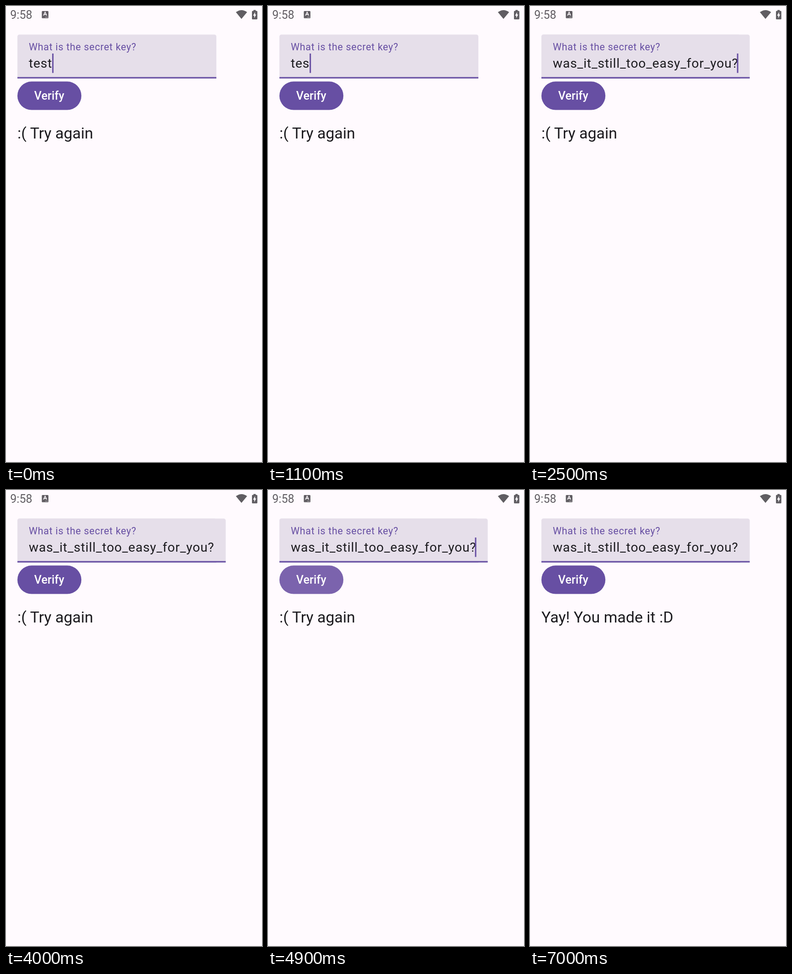
An HTML page for the animation above (7.4 s loop, 561 by 998 pixels).

```html
<!DOCTYPE html>
<html lang="en">
<head>
<meta charset="utf-8">
<title>Secret key form</title>
<style>
  html, body { margin: 0; width: 100%; height: 100%; overflow: hidden; background: #fffafe; }
  svg { display: block; width: 561px; height: 998px; }
  text { font-family: Roboto, sans-serif; fill: #1c1b1f; white-space: pre; }
  .status { fill: #605d62; }
  .clock { font-size: 25px; fill: #605d62; }
  .label { font-size: 21.5px; letter-spacing: .72px; fill: #674fa3; }
  .input { font-size: 28.2px; letter-spacing: .87px; }
  .button { font-size: 25.1px; font-weight: 500; letter-spacing: .1px; fill: #fff; text-anchor: middle; }
  .result { font-size: 34px; }

  .anim { animation: 7.4s step-end infinite; }
  #first { animation-name: first; }
  #second { animation-name: second; }
  #answer, #wide { animation-name: answer; }
  #cursor { animation-name: cursor; }
  #pill { animation-name: press; }
  #fail { animation-name: fail; }
  #win { animation-name: win; }

  @keyframes first { 0% { opacity: 1 } 12.16%, 100% { opacity: 0 } }
  @keyframes second { 0% { opacity: 0 } 12.16% { opacity: 1 } 21.62%, 100% { opacity: 0 } }
  @keyframes answer { 0% { opacity: 0 } 33.78%, 100% { opacity: 1 } }
  @keyframes fail { 0% { opacity: 1 } 67.56%, 100% { opacity: 0 } }
  @keyframes win { 0% { opacity: 0 } 67.56%, 100% { opacity: 1 } }
  @keyframes press {
    0% { fill: #674fa3 }
    66.21% { fill: #7b63ad }
    67.56% { fill: #7159a8 }
    68.91%, 100% { fill: #674fa3 }
  }
  /* the caret moves with the text and blinks every half second */
  @keyframes cursor {
    0% { transform: translateX(101.2px); opacity: 1 }
    8.1% { transform: translateX(101.2px); opacity: 0 }
    12.16% { transform: translateX(91.2px); opacity: 1 }
    21.62% { transform: translateX(50px); opacity: 1 }
    28.37% { transform: translateX(50px); opacity: 0 }
    33.78%, 47.29%, 60.81%, 74.32%, 87.83% { transform: translateX(453.5px); opacity: 1 }
    40.54%, 54.05%, 67.56%, 81.08%, 94.59%, 100% { transform: translateX(453.5px); opacity: 0 }
  }
</style>
</head>
<body>
<svg viewBox="0 0 561 998">
  <text class="clock" x="9.3" y="28">9:58</text>

  <g class="status">
    <rect x="78.5" y="11" width="14.5" height="15.7" rx="1.5"/>
    <path d="M82 21 85.7 13.4 89.4 21M83.4 18.6H88" fill="none" stroke="#fffafe" stroke-width="1.6"/>
    <path d="M86 24.3h1.2m1 0h1.2m1 0h1.2" stroke="#fffafe" stroke-width="1"/>
    <path d="M503.8 13.6Q516 4.6 528.3 13.6L516 28.2Z"/>
    <path d="M542.3 10.8V8.8H547.3V10.8H549.3Q550.8 10.8 550.8 12.3V27.7Q550.8 29.2 549.3 29.2H540.5Q539 29.2 539 27.7V12.3Q539 10.8 540.5 10.8Z"/>
    <path d="M545.8 13.2V18.5H548.3L544 26.6V21.2H541.4Z" fill="#fffafe"/>
  </g>

  <g id="field">
    <path d="M25 158.5V67.5Q25 62.5 30 62.5H456Q461 62.5 461 67.5V158.5Z" fill="#e6dfea"/>
    <rect x="25" y="155.5" width="436" height="3.1" fill="#674fa3"/>
  </g>
  <g id="wide" class="anim">
    <path d="M25 158.5V67.5Q25 62.5 30 62.5H476.5Q481.5 62.5 481.5 67.5V158.5Z" fill="#e6dfea"/>
    <rect x="25" y="155.5" width="456.5" height="3.1" fill="#674fa3"/>
  </g>

  <text class="label" x="49.9" y="97">What is the secret key?</text>
  <text id="first" class="input anim" x="49.9" y="135">test</text>
  <text id="second" class="input anim" x="49.9" y="135">tes</text>
  <text id="answer" class="input anim" x="49.9" y="135">was_it_still_too_easy_for_you?</text>
  <rect id="cursor" class="anim" y="104" width="3" height="42.5" fill="#674fa3"/>

  <rect id="pill" class="anim" x="25" y="165.3" width="140.2" height="62.3" rx="31.15" fill="#674fa3"/>
  <text class="button" x="94.8" y="205">Verify</text>

  <text id="fail" class="result anim" x="25" y="290">:( Try again</text>
  <text id="win" class="result anim" x="25" y="290">Yay! You made it :D</text>
</svg>
</body>
</html>
```
